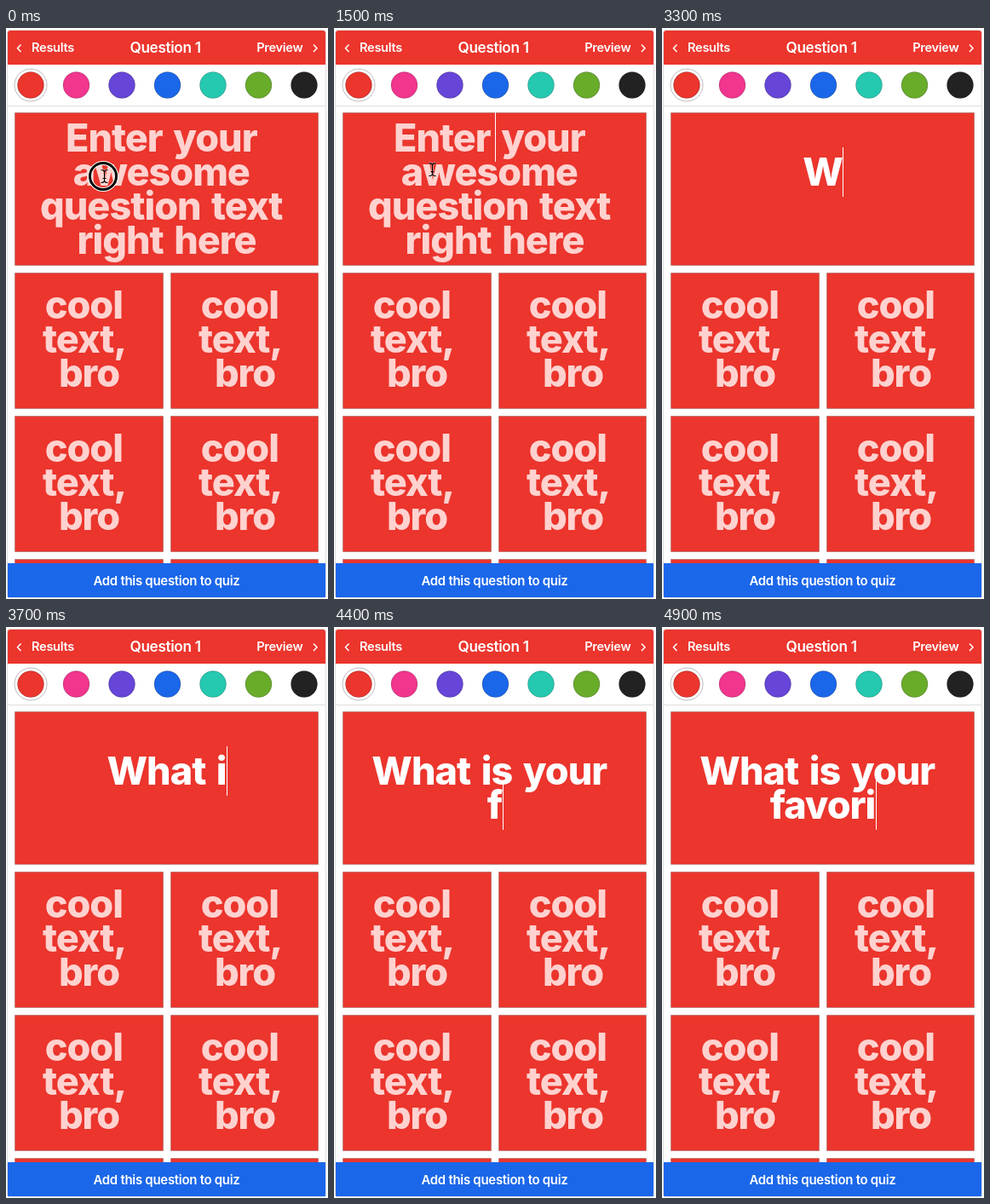
These frames come from a looping animation (378 by 670 pixels, 5000 ms). An HTML page:

```html
<!DOCTYPE html>
<html>
<head>
<meta charset="utf-8">
<style>
html, body { margin: 0; height: 100%; overflow: hidden; background: #fff; }
svg { display: block; }
text { font: 600 15px Inter, sans-serif; letter-spacing: -.02em; fill: #fff; text-anchor: middle; white-space: pre; }
.big { font-size: 45px; font-weight: 800; letter-spacing: -.022em; word-spacing: .08em; }
.faded { fill: #ffd2cf; }
.small { font-size: 14.6px; }
.edge { stroke: #0003; }
</style>
</head>
<body>
<svg width="378" height="670" viewBox="0 0 378 670">
  <rect x="1.5" y="2.5" width="374" height="666" rx="3" fill="#fff" stroke="#ddd"/>
  <path d="M2 43V6q0-3 3-3H372q3 0 3 3V43z" fill="#eb352d"/>
  <path d="M17.5 19.5l-4 4.2 4 4.2M361 19.5l4 4.2-4 4.2" fill="none" stroke="#fff" stroke-width="1.5"/>
  <text class="small" x="55" y="28">Results</text>
  <text x="187" y="29" style="font-size:17.2px">Question 1</text>
  <text class="small" x="321.3" y="28">Preview</text>
  <path d="M2 91.5H375" stroke="#ddd"/>
  <g id="colors"></g>
  <circle cx="29" cy="67" r="19" fill="none" stroke="#bbb"/>
  <g id="cards"></g>
  <rect x="2" y="628" width="373" height="40" fill="#1b67ea"/>
  <text x="188.5" y="654">Add this question to quiz</text>
  <g id="hint"></g>
  <text class="big" id="line1" x="188.5" y="185"></text>
  <text class="big" id="line2" x="188.5" y="225"></text>
  <rect id="caret" width="1" height="58" fill="#fff"/>
  <g id="mouse" fill="none">
    <g id="ring">
      <circle cx="-1" r="15.5" stroke="#fff" stroke-width="5"/>
      <circle cx="-1" r="15.5" stroke="#000" stroke-width="3"/>
    </g>
    <g id="beam">
      <path d="M-3.5-7.5Q0-7.5 .5-5.5Q1-7.5 4.5-7.5M.5-6V6M-3.5 7.5Q0 7.5 .5 5.5Q1 7.5 4.5 7.5M-1.5 2.5H2.5" stroke="#fff" stroke-width="2.6" opacity=".5"/>
      <path d="M-3.5-7.5Q0-7.5 .5-5.5Q1-7.5 4.5-7.5M.5-6V6M-3.5 7.5Q0 7.5 .5 5.5Q1 7.5 4.5 7.5M-1.5 2.5H2.5" stroke="#000" stroke-width="1.2"/>
    </g>
  </g>
</svg>
<script>
const $ = id => document.getElementById(id);
const show = (id, on) => $(id).style.display = on ? '' : 'none';
const MESSAGE = 'What is your favorite';
const FIRST = 13; // characters that fit on the first line

const lines = (list, x, y) => list.map((s, i) =>
  `<text class="big faded" x="${x}" y="${y + 40 * i}">${s}</text>`).join('');
const card = (x, y, w, h) =>
  `<rect class="edge" x="${x + .5}" y="${y + .5}" width="${w - 1}" height="${h - 1}" fill="#eb352d"/>`;

$('colors').innerHTML = ['#eb352d', '#f2358f', '#6645d8', '#1b67ea', '#25c9b0', '#69ac2a', '#222']
  .map((c, i) => `<circle class="edge" cx="${29 + 53.5 * i}" cy="67" r="15.5" fill="${c}"/>`).join('');

let html = card(10, 99, 357, 180);
for (const [x, w] of [[10, 175], [193, 174]]) {
  for (const y of [287, 455]) {
    html += card(x, y, w, 160) + lines(['cool ', 'text, ', 'bro'], x + 87.5, y + 54);
  }
  html += card(x, 623, w, 20);
}
$('cards').innerHTML = html;
$('hint').innerHTML = lines(['Enter your ', 'awesome ', 'question text ', 'right here'], 188.5, 145);

function typedCount(t) {
  if (t < 3300) return 0;
  return t < 4100 ? Math.floor((t - 3220) / 80) : 11 + Math.floor((t - 4100) / 100);
}

function draw(t) {
  const n = typedCount(t), text = MESSAGE.slice(0, n), wrapped = n > FIRST;
  $('line1').textContent = text.slice(0, FIRST);
  $('line2').textContent = text.slice(FIRST);
  show('hint', !n);

  const last = $(wrapped ? 'line2' : 'line1');
  const x = 189 + (n ? last.getComputedTextLength() / 2 : 0);
  $('caret').setAttribute('x', Math.round(x));
  $('caret').setAttribute('y', n ? (wrapped ? 180 : 140) : 99);
  show('caret', n || t >= 200 && (t - 200) % 1000 < 500);

  const p = Math.min(1, Math.max(0, (t - 1300) / 600));
  const y = 174 - 30 * p * p * (3 - 2 * p);
  $('mouse').setAttribute('transform', `translate(115 ${y})`);
  show('mouse', !n);
  show('ring', t < 200);
}

const start = performance.now();
function frame(now) {
  draw(Math.max(0, now - start) % 5000);
  requestAnimationFrame(frame);
}
draw(0);
requestAnimationFrame(frame);
</script>
</body>
</html>
```
